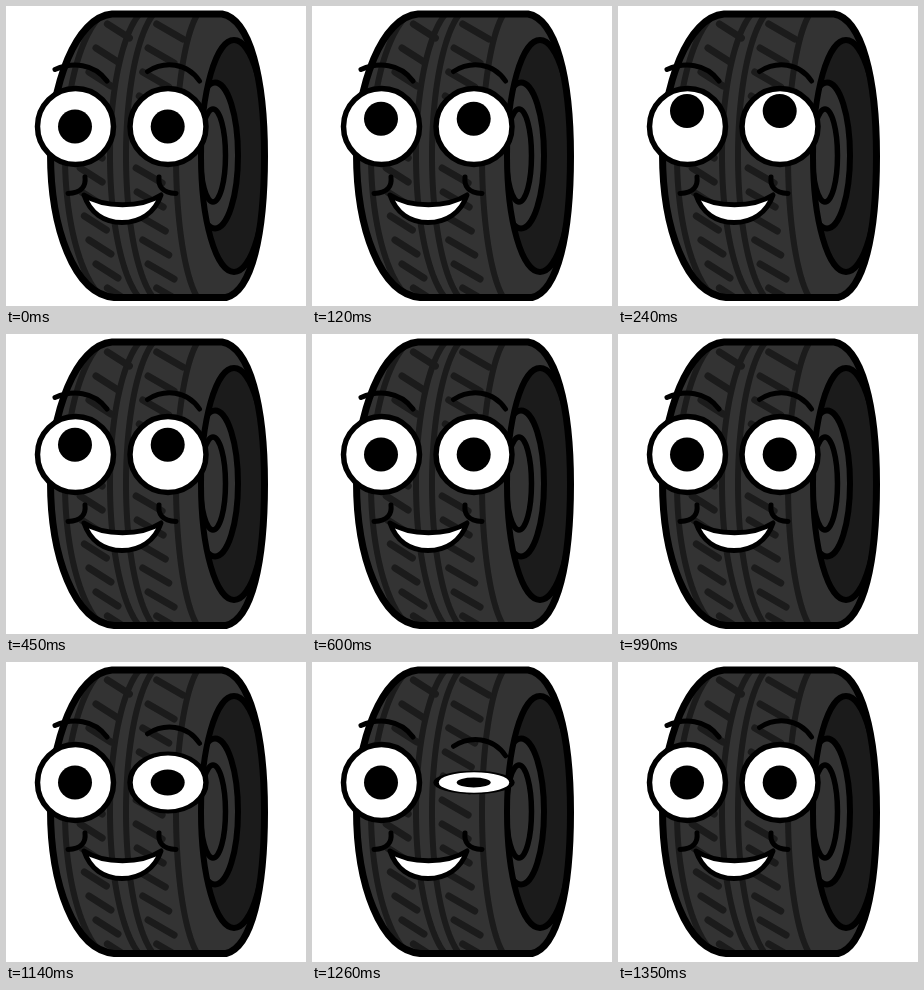
Animation, 300 px wide and 300 px high, one loop 1500 ms. Source, as an HTML page with a canvas:

```html
<!DOCTYPE html>
<html>
<head>
<meta charset="utf-8">
<title>Winking tyre</title>
<style>
html, body { margin: 0; width: 100%; height: 100%; overflow: hidden; background: #fff; }
canvas { display: block; width: 300px; height: 300px; }
</style>
</head>
<body>
<canvas id="stage"></canvas>
<script>
const LOOP = 1500, STEP = 30;
const RUBBER = '#333', GROOVE = '#1b1b1b', INK = '#000';
const canvas = document.getElementById('stage');
const ctx = canvas.getContext('2d');
const dpr = window.devicePixelRatio || 1;
canvas.width = canvas.height = 300 * dpr;
ctx.lineCap = ctx.lineJoin = 'round';

const body = new Path2D('M106 8 H216 C244 13 258.5 72 258.5 150 C258.5 228 246 285 220 291.5 H108 C68 288 44.5 222 44.5 148 C44.5 78 70 11 106 8 Z');

function stroke(path, width, color = INK) {
  ctx.strokeStyle = color;
  ctx.lineWidth = width;
  ctx.stroke(typeof path === 'string' ? new Path2D(path) : path);
}

function ellipse(x, y, rx, ry) {
  const p = new Path2D();
  p.ellipse(x, y, rx, ry, 0, 0, Math.PI * 2);
  return p;
}

function fill(path, color) {
  ctx.fillStyle = color;
  ctx.fill(path);
}

// Horizontal bulge of the tread at height y
const bend = y => 58 * (1 - Math.sqrt(Math.max(0, 1 - ((y - 150) / 150) ** 2)));

function groove(mid, k) {
  const p = new Path2D();
  for (let y = 4; y <= 296; y += 4) p.lineTo(mid + k * bend(y), y);
  stroke(p, 6, GROOVE);
}

function slashes(mid, k, width, rise) {
  for (let y = 18; y < 300; y += 24) {
    const x = mid + k * bend(y);
    const p = new Path2D();
    p.moveTo(x, y);
    p.lineTo(x + width, y + rise);
    stroke(p, 7, GROOVE);
  }
}

function drawTyre() {
  fill(body, RUBBER);
  ctx.save();
  ctx.clip(body);
  groove(59, 0.95);
  groove(104, 0.75);
  groove(120, 0.7);
  groove(170, 0.55);
  slashes(74, 0.9, 22, 14);
  slashes(130, 0.68, 26, 15);

  const rim = ellipse(228, 150, 33, 116);
  fill(rim, GROOVE);
  ctx.save();
  ctx.clip(rim);
  const hub = ellipse(209, 149.5, 23, 73);
  fill(hub, RUBBER);
  stroke(hub, 6);
  stroke(ellipse(207, 149.5, 12.5, 46.5), 5.5);
  ctx.restore();
  stroke(rim, 6);
  ctx.restore();
  stroke(body, 7);
}

function drawMouth() {
  const smile = new Path2D('M78 189 C98 202 135 202 155 189 C149 207 134 216.5 116 216.5 C98 216.5 84 207 78 189 Z');
  fill(smile, '#fff');
  stroke(smile, 5);
  stroke('M79 171 C80 180 76 187 62 187.5', 5);
  stroke('M153 171 C152 180 156 187 170 187.5', 5);
}

function drawEye(x, pupilX, look, open) {
  ctx.save();
  ctx.translate(0, 120.5);
  ctx.scale(1, open);
  const ball = ellipse(x, 0, 38, 38);
  fill(ball, '#fff');
  stroke(ball, 5.5);
  fill(ellipse(pupilX, -look, 17, 17), INK);
  ctx.restore();
}

function drawBrow(path, dy) {
  ctx.save();
  ctx.translate(0, dy);
  stroke(path, 5);
  ctx.restore();
}

const clamp = v => Math.min(1, Math.max(0, v));
const ramp = (t, from, to) => clamp((t - from) / (to - from));
const pulse = (t, peak) => clamp(1 - Math.abs(t - peak) / 120);

function draw(now) {
  const t = Math.floor((now % LOOP) / STEP) * STEP;
  const look = 15.5 * (ramp(t, 0, 240) - ramp(t, 360, 600));
  const raise = -19.5 * pulse(t, 870);
  const wink = pulse(t, 1230);

  ctx.setTransform(dpr, 0, 0, dpr, 0, 0);
  ctx.fillStyle = '#fff';
  ctx.fillRect(0, 0, 300, 300);
  drawTyre();
  drawMouth();
  drawEye(69.5, 69, look, 1);
  drawEye(162, 161.7, look, 1 - 0.95 * wink);
  drawBrow('M49 63.5 C66 56 88 57 101 75', raise);
  drawBrow('M141.5 65.5 C158 55 181 56 193.5 75', raise + 25 * wink);
}

let start;
function tick(now) {
  if (start === undefined) start = now;
  draw(now - start);
  requestAnimationFrame(tick);
}
draw(0);
requestAnimationFrame(tick);
</script>
</body>
</html>
```
